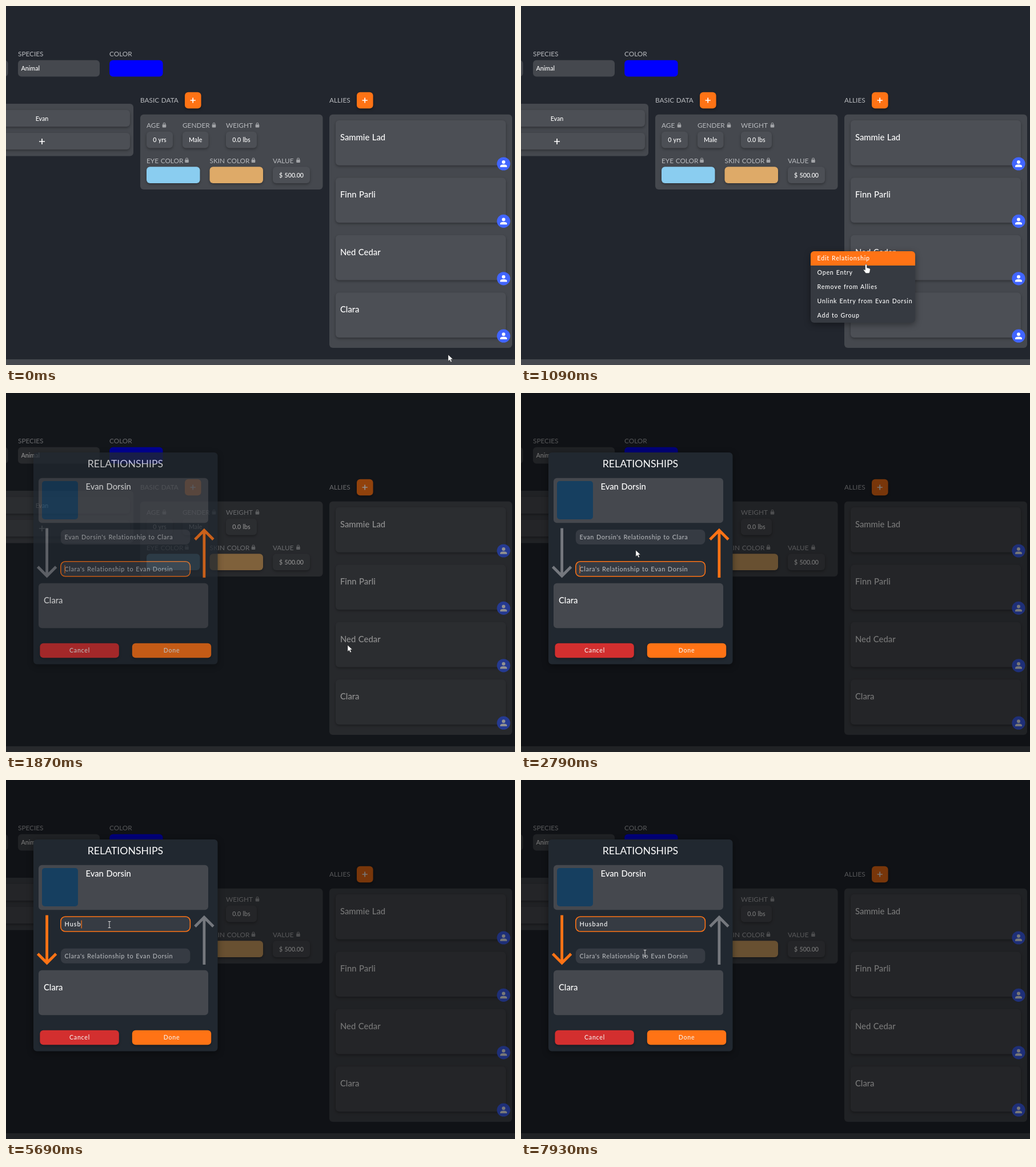
These frames come from a looping animation (891 px wide and 628 px high, 8 s). An HTML page:

```html
<!DOCTYPE html>
<html lang="en">
<head>
<meta charset="utf-8">
<title>Relationship editor</title>
<style>
  html, body { margin: 0; width: 100%; height: 100%; overflow: hidden; background: #22262e; }
  svg { display: block; }
  text { font-family: Lato, "Open Sans", sans-serif; fill: #fff; word-spacing: .06em; white-space: pre; }
  .label { font-size: 11.8px; fill: #b9bbbf; }
  .name { font-size: 14.8px; font-weight: 500; }
  .value { font-size: 10.7px; font-weight: 500; }
  .title { font-size: 17.7px; }
  .item { font-size: 10.6px; font-weight: 500; letter-spacing: .8px; }
  .button { font-size: 10.6px; font-weight: 500; letter-spacing: .75px; fill: #f6f1ee; }
  .hint { font-size: 10.9px; font-weight: 500; letter-spacing: .6px; fill: #b2b5b9; }
  .typed { font-size: 10.9px; font-weight: 500; letter-spacing: 1px; }
  .raised { filter: drop-shadow(0 2px 2px rgba(0, 0, 0, .32)); }
  .floating { filter: drop-shadow(0 3px 6px rgba(0, 0, 0, .4)); }
  .mid { text-anchor: middle; }
</style>
</head>
<body>
<svg id="stage" width="891" height="628" viewBox="0 0 891 628"></svg>
<script>
const LOOP = 8000;
const ORANGE = '#ff7315', PANEL = '#45484e', CARD = '#4c4f55', GRAY = '#75787e';
const HERO = 'Evan Dorsin', FRIEND = 'Clara', TYPED = 'Husband';
const ALLIES = ['Sammie Lad', 'Finn Parli', 'Ned Cedar', FRIEND];
const MENU = { x: 507, y: 429, w: 183, row: 25 };
const FIELDS = [{ y: 239, h: 26 }, { y: 294.8, h: 26 }];

// Markup helpers
const box = (x, y, w, h, fill, r = 6, extra = '') =>
  `<rect x="${x}" y="${y}" width="${w}" height="${h}" rx="${r}" fill="${fill}" ${extra}/>`;
const raised = (x, y, w, h, fill = CARD) => box(x, y, w, h, fill, 6, 'class="raised"');
const text = (x, y, cls, str, extra = '') => `<text x="${x}" y="${y}" class="${cls}" ${extra}>${str}</text>`;
const plus = (x, y, r) =>
  `<path d="M${x - r} ${y}h${2 * r}M${x} ${y - r}v${2 * r}" stroke="#fff" stroke-width="1.7"/>`;
const addButton = x => raised(x, 150.7, 28.6, 28.6, ORANGE) + plus(x + 14.2, 165, 4.6);
const lock = (x, y) => `<g transform="translate(${x} ${y})">${box(-3.3, -1.3, 6.6, 5.4, '#a2a4a8', 1)}
  <path d="M-1.8 -1v-1.2a1.8 1.8 0 0 1 3.6 0v1.2" fill="none" stroke="#a2a4a8" stroke-width="1.1"/></g>`;
const stat = (x, y, name, lockX, w, value, fill) => text(x, y + 4.5, 'label', name) + lock(lockX, y) +
  raised(x, y + 11.3, w, 28.6, fill) + text(x + w / 2, y + 29.5, 'value mid', value);
const ally = (name, i) => {
  const y = 200 + i * 100.4;
  return raised(577, y, 298, 78.7) + text(585, y + 35, 'name', name) +
    `<g transform="translate(871 ${y + 76})"><circle r="11.6" fill="#4165ff"/>
     <circle cy="-3" r="3" fill="#fff"/><path d="M-6 5.8v-1.3q0-3.2 6-3.2t6 3.2v1.3z" fill="#fff"/></g>`;
};

function pageMarkup() {
  return box(0, 0, 891, 628, '#22262e', 0) + box(0, 618, 891, 10, PANEL, 0) +
    box(-40, 94.8, 43.5, 28.6, PANEL) +
    text(21, 87.5, 'label', 'SPECIES') + box(21, 94.8, 143, 28.6, PANEL) + text(26.5, 113, 'value', 'Animal') +
    text(181, 87.5, 'label', 'COLOR') + box(181.2, 94.8, 93.4, 28.6, '#0000ff') +
    box(-40, 171, 263, 91.5, PANEL) + raised(-40, 182, 257, 29) + raised(-40, 222, 257, 29) +
    text(63, 200.5, 'value mid', 'Evan') + plus(63, 237, 5) +
    text(235, 168.5, 'label', 'BASIC DATA') + addButton(313) + box(235, 189.7, 319.5, 131.3, PANEL) +
    stat(246, 208.5, 'AGE', 277, 46, '0 yrs', CARD) +
    stat(309, 208.5, 'GENDER', 364, 45.5, 'Male', CARD) +
    stat(385, 208.5, 'WEIGHT', 440, 54, '0.0 lbs', CARD) +
    stat(246, 270, 'EYE COLOR', 316.5, 93.5, '', '#8acdf0') +
    stat(356.5, 270, 'SKIN COLOR', 433, 93.5, '', '#deaa68') +
    stat(467, 270, 'VALUE', 511.5, 65, '$ 500.00', CARD) +
    text(566, 168.5, 'label', 'ALLIES') + addButton(614) + box(566, 189.7, 320, 408.3, PANEL) +
    ALLIES.map(ally).join('');
}

function menuMarkup() {
  const items = ['Edit Relationship', 'Open Entry', 'Remove from Allies', `Unlink Entry from ${HERO}`, 'Add to Group'];
  const { x, y, w, row } = MENU, h = row * items.length;
  return `<clipPath id="menuShape">${box(x, y, w, h, '#000')}</clipPath>
    ${box(x, y, w, h, '#363a41', 6, 'class="floating"')}
    <g clip-path="url(#menuShape)">${box(x, y, w, row, ORANGE, 0, 'id="hover"')}</g>` +
    items.map((s, i) => text(x + 11.5, y + 16 + i * row, 'item', s)).join('');
}

function dialogMarkup() {
  const field = ({ y, h }, i, hint) =>
    box(95.8, y, 226.6, h, '#363b43', 8, `id="field${i}" stroke-width="1.6"`) + text(102.5, y + 17, 'hint', hint, `id="hint${i}"`);
  const arrow = (id, d) => `<path id="${id}" d="${d}" fill="none" stroke-width="4.8"/>`;
  return box(48, 104, 322.5, 370.5, '#212830', 6, 'class="floating"') +
    text(209, 130, 'title mid', 'RELATIONSHIPS') +
    box(57, 148.7, 297, 78.6, PANEL) + box(63, 154, 63, 67, '#163f60', 5) + text(139.5, 168.5, 'name', HERO) +
    field(FIELDS[0], 0, `${HERO}'s Relationship to ${FRIEND}`) +
    field(FIELDS[1], 1, `${FRIEND}'s Relationship to ${HERO}`) +
    text(102.5, 256, 'typed', '', 'id="typed"') + box(0, 0, 1.2, 14, ORANGE, 0, 'id="caret"') +
    arrow('down', 'M71.6 236.5V319M55.6 304L71.6 320L87.6 304') +
    arrow('up', 'M346.9 323V240.5M330.9 256.2L346.9 240.2L362.9 256.2') +
    box(57, 332.7, 297, 78.6, PANEL) + text(66, 367.5, 'name', FRIEND) +
    raised(59.4, 437.8, 138.4, 25.4, '#d32f2f') + text(129, 454, 'button mid', 'Cancel') +
    raised(220.8, 437.8, 138.4, 25.4, ORANGE) + text(290, 454, 'button mid', 'Done');
}

const cursorMarkup = `<circle id="ripple" r="8.8" fill="#fff" fill-opacity=".25"/>
  <path id="pointer" d="M0 0V11.3L2.7 8.9L4.6 13L6.5 12.1L4.7 8.1L8.2 7.8Z" fill="#fff" stroke="#222" stroke-width=".5"/>
  <path id="hand" d="M-1.5 1.2q0-1.4 1.5-1.4t1.5 1.4v4.6l4.4 1.2q1.6.5 1.4 2l-.7 4.4q-.4 2.2-2.2 2.2h-3.8q-1.2 0-2-1.2l-3.2-4.6q.8-1.5 3.1.2z"
    fill="#fff" stroke="#222" stroke-width=".5"/>
  <path id="beam" d="M-2.3 -5.5H2.3M0 -5.5V5.5M-2.3 5.5H2.3" stroke="#d8d8d8" stroke-width="1"/>`;

const $ = id => document.getElementById(id);
$('stage').innerHTML = `${pageMarkup()}<g id="menu">${menuMarkup()}</g>
  ${box(0, 0, 891, 628, '#000', 0, 'id="dim"')}
  <g id="dialog">${dialogMarkup()}</g><g id="cursor">${cursorMarkup}</g>`;

// Timeline: times in ms
const PATH = [[50, 774, 610], [220, 690, 554], [640, 690, 554], [1090, 604, 452], [1320, 598, 441],
  [1880, 598, 441], [2560, 234, 312], [2790, 201, 275], [3030, 181, 253], [7400, 181, 253],
  [7780, 224, 302], [7930, 217, 303]];
const DIALOG_FADE = [[1790, .15], [1870, .75], [1940, .95], [2020, 1]];
const DIM_FADE = [[1790, .07], [1870, .43], [1940, .51], [2020, .53]];
const KEYS = [4980, 5210, 5440, 5690, 5840, 5990, 6310];
const CARET_TOGGLES = [1790, 2320, 2790, 3350, 3820, 4280, 4830, 6770, 7240, 7700];
const CLICKS = [[390, 560], [1640, 1790], [3750, 3820]];
const FOCUS_SWITCH = 3820;

const passed = (times, t) => times.filter(at => t >= at).length;
const within = (t, a, b) => t >= a && t < b;
const held = (steps, t) => steps.reduce((v, [at, next]) => t >= at ? next : v, 0);
const show = (id, on) => $(id).setAttribute('visibility', on ? 'visible' : 'hidden');

function cursorAt(t) {
  const i = PATH.findIndex(p => p[0] > t);
  if (i === 0) return PATH[0].slice(1);
  if (i < 0) return PATH[PATH.length - 1].slice(1);
  const [t0, x0, y0] = PATH[i - 1], [t1, x1, y1] = PATH[i], k = (t - t0) / (t1 - t0);
  return [x0 + (x1 - x0) * k, y0 + (y1 - y0) * k];
}

function render(t) {
  const [x, y] = cursorAt(t);
  const menuOpen = within(t, 560, 1790), dialogOpen = t >= 1790;
  const inMenu = menuOpen && within(x, MENU.x, MENU.x + MENU.w) && within(y, MENU.y, MENU.y + 5 * MENU.row);
  const inField = dialogOpen && within(x, 95, 323) && FIELDS.some(f => within(y, f.y, f.y + f.h));

  $('menu').style.display = menuOpen ? '' : 'none';
  $('hover').style.display = inMenu ? '' : 'none';
  $('hover').setAttribute('y', MENU.y + Math.floor((y - MENU.y) / MENU.row) * MENU.row);

  $('dim').setAttribute('opacity', held(DIM_FADE, t));
  $('dialog').style.display = dialogOpen ? '' : 'none';
  $('dialog').setAttribute('opacity', held(DIALOG_FADE, t));

  const focus = t < FOCUS_SWITCH ? 1 : 0;
  FIELDS.forEach((_, i) => $('field' + i).setAttribute('stroke', i === focus ? ORANGE : 'none'));
  $('down').setAttribute('stroke', focus ? GRAY : ORANGE);
  $('up').setAttribute('stroke', focus ? ORANGE : GRAY);

  const count = passed(KEYS, t), typed = $('typed');
  typed.textContent = TYPED.slice(0, count);
  $('hint0').style.display = count ? 'none' : '';
  const caret = $('caret');
  caret.style.display = passed(CARET_TOGGLES, t) % 2 ? '' : 'none';
  caret.setAttribute('x', 102.4 + (count && dialogOpen ? typed.getComputedTextLength() : 0));
  caret.setAttribute('y', FIELDS[focus].y + 6.5);

  $('cursor').setAttribute('transform', `translate(${x} ${y})`);
  show('hand', inMenu);
  show('beam', inField);
  show('pointer', !inMenu && !inField);
  show('ripple', CLICKS.some(([a, b]) => within(t, a, b)));
}

const start = performance.now();
function tick() {
  render((performance.now() - start) % LOOP);
  requestAnimationFrame(tick);
}
tick();
</script>
</body>
</html>
```
